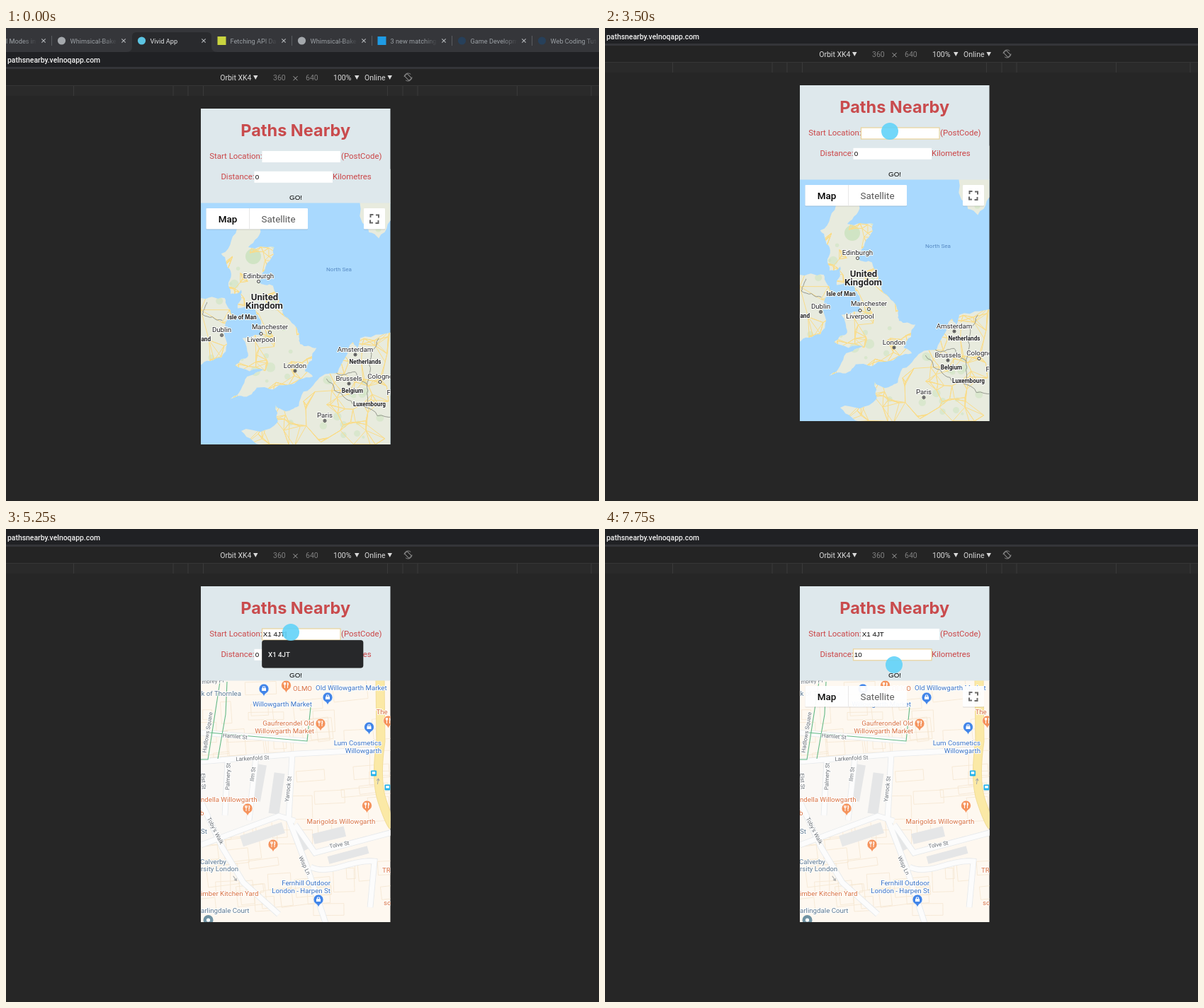
These frames come from a looping animation (837x669 px, 8000 ms). An HTML page:

```html
<!DOCTYPE html>
<html lang="en">
<head>
<meta charset="utf-8">
<title>Route planner demo</title>
<style>
html, body { margin: 0; width: 100%; height: 100%; overflow: hidden; background: #262626; }
svg { display: block; font-family: Roboto, sans-serif; }
text { font-size: 9.7px; fill: #222; }
.mid { text-anchor: middle; }
.end { text-anchor: end; }
.tab { font-size: 9.2px; fill: #9ba0a5; }
.tab.on { fill: #e2e4e6; }
.tool { font-size: 10.5px; fill: #dadada; }
.tool.dim { fill: #808080; }
.url { font-size: 10.4px; font-weight: 500; fill: #f2f2f2; }
.title { font: bold 23.5px Inter, sans-serif; fill: #c94b4d; }
.label { font-size: 11.4px; fill: #cb4547; }
.field { font: 9.8px "Liberation Sans", sans-serif; fill: #000; }
.button { font-size: 13.4px; fill: #565656; }
.button.on { fill: #000; font-weight: 500; }
.item { font-weight: 500; fill: #f2f2f2; }
.status { font-size: 9px; fill: #c4c6c8; }
.map text { paint-order: stroke; stroke: #fff; stroke-width: 2px; stroke-linejoin: round; }
.map .country { font-size: 8.2px; font-weight: bold; }
.map .nation { font-size: 13.2px; font-weight: bold; }
.map .sea { font-size: 8.1px; fill: #5689c2; stroke: none; }
.map .food { fill: #d8703f; }
.map .shop { fill: #3972c4; }
.map .civic { fill: #5c7890; }
.map .road { font-size: 8px; fill: #666c72; text-anchor: middle; }
</style>
</head>
<body>
<script>
const LOOP = 8000, STEP = 250, POSTCODE = 'X1 4JT';
const HISTORY = ['X10 3hd', POSTCODE, 'X17 2PE'];

let seed = 11;
const rand = () => (seed = (seed * 16807) % 2147483647) / 2147483647;
const mix = (a, b, k) => a + (b - a) * k;
const repeat = (n, make) => Array.from({ length: n }, (_, i) => make(i)).join('');

const text = (x, y, str, cls = '', turn = 0) =>
  `<text x="${x}" y="${y}" class="${cls}" transform="rotate(${turn} ${x} ${y})">${str}</text>`;
const rect = (x, y, w, h, fill, more = '') =>
  `<rect x="${x}" y="${y}" width="${w}" height="${h}" fill="${fill}" ${more}/>`;
const dot = (x, y, r, fill, more = '') =>
  `<circle cx="${x}" cy="${y}" r="${r}" fill="${fill}" ${more}/>`;
const line = (d, stroke, width = 1, more = '') =>
  `<path d="${d}" fill="none" stroke="${stroke}" stroke-width="${width}" ${more}/>`;
const poly = (points, fill) => `<polygon points="${points}" fill="${fill}"/>`;
const tilted = (x, y, w, h, turn, fill, more = '') =>
  rect(x - w / 2, y - h / 2, w, h, fill, `transform="rotate(${turn} ${x} ${y})" ${more}`);

// ---- Country map: a few Mercator key points, roughened by midpoint displacement ----
const merc = lat => Math.log(Math.tan(Math.PI / 4 + lat * Math.PI / 360));
const project = (lon, lat) => [408 + 16.6 * (lon + .12), 452 - 951 * (merc(lat) - merc(51.5))];

function rough(points, depth = 3, amount = .3) {
  if (!depth) return points;
  const out = [];
  points.forEach(([x, y], i) => {
    out.push([x, y]);
    const next = points[i + 1];
    if (!next) return;
    const k = (rand() - .5) * amount, dx = next[0] - x, dy = next[1] - y;
    out.push([x + dx / 2 - dy * k, y + dy / 2 + dx * k]);
  });
  return rough(out, depth - 1, amount);
}
const geo = str => rough(str.split(' ').map(p => project(...p.split(',').map(Number))))
  .map(p => p.map(v => v.toFixed(1)).join()).join(' ');

const lands = [
  '-3.1,58.6 -4.1,57.6 -1.9,57.6 -2.9,56.4 -3.2,56 -2,55.8 -1.2,54.6 .1,53.6 .3,52.9 1.7,52.7 .7,51.5 ' +
  '1.4,51.2 -.8,50.75 -3.4,50.6 -3.8,50.25 -5.6,50 -4.2,51.2 -2.7,51.55 -5.2,51.8 -4.1,52.3 -4.6,53.2 ' +
  '-3,53.4 -3,54 -3.5,54.6 -3.2,55 -5,54.7 -4.7,55.6 -5.6,55.4 -5.6,56.5 -6.4,57.3 -5,58.6',
  '-8.3,55.2 -6.1,55.2 -5.5,54.4 -6.1,53.7 -6.4,52.2 -8.3,51.8',
  '-2.5,47.2 -4.7,48.2 -1.6,48.7 -1.8,49.7 -1.1,49.35 .2,49.6 1.6,50.9 3.5,51.4 4.8,53 5.2,52.5 5.4,53.2 9,53.7 9,47',
  '5,61 5.6,58.7 7,58 9,59 9,61'
].map(p => poly(geo(p), '#e8ebde')).join('');

const borders = ['2.55,51.08 4.2,50 5.8,49.55 6,50.75 5,51.45 3.4,51.38', '6,50.75 6.2,51.8 7,53.2',
  '5.8,49.55 8.2,49', '-7.6,55 -8,54.4 -6.3,54.1'].map(p => line('M' + geo(p), '#8d9087', .9)).join('');

// Random towns, each joined to its nearest neighbours
function roadNet() {
  const towns = Array.from({ length: 300 }, () => [275 + rand() * 268, 275 + rand() * 285]);
  let d = '';
  for (const [x, y] of towns) {
    const gap = p => Math.hypot(p[0] - x, p[1] - y);
    for (const n of [...towns].sort((a, b) => gap(a) - gap(b)).slice(1, 5))
      d += `M${x.toFixed(1)} ${y.toFixed(1)}L${n[0].toFixed(1)} ${n[1].toFixed(1)}`;
  }
  return line(d, '#f9dc8a', 1);
}
const woods = repeat(60, () => dot(275 + rand() * 268, 250 + rand() * 306, 2 + rand() * 5, '#d0e4c4', 'opacity=".6"'));

const city = (name, x, y, capital, dy = -4.5) =>
  dot(x, y, 2, '#fff', 'stroke="#333"') + (capital ? dot(x, y, 1, '#222') : '') + text(x, y + dy, name, 'mid');

const countryMap = rect(275, 214, 268, 342, '#a9d9fe') + lands +
  `<g clip-path="url(#land)">${woods}${dot(349, 290, 11, '#d0e4c4')}${roadNet()}</g>` + borders +
  city('Edinburgh', 356.5, 325.5) + city('Manchester', 372.5, 397.5) + city('Liverpool', 360, 399.5, 0, 11) +
  city('Dublin', 304.5, 401.5, 1) + city('London', 408, 452, 1) + city('Paris', 450, 522.5, 1) +
  city('Amsterdam', 493, 429, 1) + city('Brussels', 484, 470, 1) + city('Cologne', 528, 467.5) +
  text(537.5, 486, 'Frankfurt') + text(289, 409.5, 'Ireland', 'country end') +
  text(365, 352, 'United', 'nation mid') + text(364.5, 364, 'Kingdom', 'nation mid') +
  text(333, 379, 'Isle of Man', 'country mid') + text(507, 442, 'Netherlands', 'country mid') +
  text(489, 482.5, 'Belgium', 'country mid') + text(513, 501.5, 'Luxembourg', 'country mid') +
  text(470, 311, 'North Sea', 'sea mid');

// ---- Street map ----
const streets = ['M275 329L410 318L523 312', 'M404 318L399 410L425 478L452 560', 'M408 418L436 458L545 429',
  'M275 385L305 450L335 500L385 545', 'M313 328L309 405', 'M353 322L343 412', 'M275 447L385 406L408 413',
  'M430 478Q445 486 475 477T520 470L514 535', 'M275 288L425 300'].join('');
const mainRoad = 'M528 214L529 300Q521 355 531 385T546 420';
const plots = repeat(70, () => tilted(275 + rand() * 268, 225 + rand() * 331, 12 + rand() * 40, 10 + rand() * 28,
  rand() * 8 - 8, 'none', 'stroke="#f6e7d2" stroke-width=".8"'));
const blocks = tilted(357, 359, 13, 52, 10, '#e5e6e7') + tilted(382, 374, 15, 58, 8, '#e5e6e7') +
  tilted(362, 432, 62, 16, -18, '#e7e8e8') + tilted(417, 438, 11, 34, -28, '#e5e6e7') +
  tilted(456, 433, 46, 15, -14, '#e5e6e7') + tilted(483, 461, 58, 11, -15, '#e5e6e7');

const pin = (x, y, kind) => {
  const food = kind === 'food';
  const mark = food
    ? line(`M${x - 2} ${y - 5}v8m-1.2 -8v3h2.4v-3M${x + 2} ${y + 3}v-8q2 2 0 5`, '#fff')
    : rect(x - 3, y - 2, 6, 4, '#fff') + line(`M${x - 1.6} ${y - 2}v-2h3.2v2`, '#fff');
  return `<path d="M${x} ${y + 10}q-1 -4 -5 -6a7 7 0 1 1 10 0q-4 2 -5 6z" fill="${food ? '#f5935c' : '#4285e8'}"
    stroke="#fff" stroke-width=".6"/>` + mark;
};
// A pin with its one- or two-line label
const place = (kind, px, py, x, y, lines, align = 'end') => pin(px, py, kind) +
  lines.map((s, i) => text(x, y + 10.5 * i, s, `${kind} ${align}`)).join('');
const stop = (x, y) => rect(x - 4, y - 4, 8, 8, '#22b2ea', 'rx="1"') + rect(x - 2.3, y - 2.3, 4.6, 3.4, '#fff');
const arrow = (x, y, turn) =>
  line(`M${x} ${y + 4}v-8m-2 3l2 -3l2 3`, '#a3a7aa', 1, `transform="rotate(${turn} ${x} ${y})"`);

const streetMap = rect(275, 214, 268, 342, '#fef8f0') + plots + poly('275,330 402,320 398,408 275,445', '#faf8f5') +
  blocks + line(streets, '#e6e9eb', 8.6) + line(streets, '#fcfcfc', 7) +
  line(mainRoad, '#f2dd97', 13) + line(mainRoad, '#fbe9a6', 11) +
  line('M312 216L310 262L299 325M287 288L425 300L430 252M275 326H285L302 216', '#62b985', 1.1) +
  stop(519, 345.5) + stop(538.5, 365.5) + arrow(525, 357, 8) + arrow(323, 494, 145) +
  text(292, 218, 'mbrey Pl', 'road', -4) + text(287, 288, 'Hadlows Square', 'road', -81) +
  text(323, 296, 'Hamlet St', 'road', 5) + text(348, 327, 'Larkenfold St', 'road', -3) +
  text(316, 350, 'Palmery St', 'road', -88) + text(351, 347, 'Ilm St', 'road', -83) +
  text(401, 368, 'Yarrock St', 'road', -84) + text(276, 357, 'Elst St', 'road', 86) +
  text(293, 428, "Toby's Walk", 'road', 63) + text(419, 477, 'Wisp Ln', 'road', 65) +
  text(471, 449, 'Tolve St', 'road', -10) + text(275, 431, 'St', 'civic') +
  place('food', 395.5, 222, 405, 229, ['OLMO'], '') +
  place('shop', 364, 227, 390, 251, ['Willowgarth Market'], 'mid') +
  place('shop', 454, 239, 437, 228, ['Old Willowgarth Market'], '') +
  place('food', 444, 276, 435, 278, ['Gaufrerondel Old', 'Willowgarth Market']) +
  place('shop', 512.5, 281, 530, 306, ['Lum Cosmetics', 'Willowgarth']) +
  place('food', 539.5, 272, 522.5, 261.5, ['The'], '') +
  place('food', 341, 396, 275, 385.5, ['ndella Willowgarth'], '') +
  place('food', 509.5, 392, 473, 416.5, ['Marigolds Willowgarth'], 'mid') +
  place('food', 377, 447, 274, 405, ['b'], '') +
  place('shop', 441, 525, 458, 504, ['Fernhill Outdoor', 'London - Harpen St']) +
  text(275.5, 236, 'k of Thornlea', 'civic') + text(274, 473.5, 'Calverby', 'civic') +
  text(275, 484, 'rsity London', 'civic') + text(275, 542.5, 'arlingdale Court', 'civic') +
  text(275, 519, 'imber Kitchen Yard', 'food') + text(531, 486, 'TR', 'food') + text(533, 531.5, 'so', 'food') +
  dot(285.5, 553, 7, '#6f92a2') + dot(285.5, 553, 2.6, '#fff');

// ---- Browser chrome ----
const TABS = [['', 'l Modes in'], ['#a4a8ac', 'Whimsical-Bake'], ['#5cc4e2', 'Vivid App'], ['#c9d43f', 'Fetching API Da'],
  ['#a4a8ac', 'Whimsical-Bake'], ['#1f9be4', '3 new matching'], ['#27405a', 'Game Developm'], ['#27405a', 'Web Coding Tutor']];
const ACTIVE = 2;

function tab([color, name], i) {
  const x = 64 + 113 * (i - 1), on = i === ACTIVE;
  const square = color === '#c9d43f' || color === '#1f9be4';
  const icon = !color ? '' : square ? rect(x + 8.5, 12, 12, 12, color) : dot(x + 14.5, 18, 5.6, color);
  return icon + text(color ? x + 26.5 : 0, 21.5, name, on ? 'tab on' : 'tab') +
    (on ? '' : rect(x + 73, 10, 22, 16, 'url(#fade)')) +
    line(`M${x + 99.3} 15.3l5.4 5.4m0 -5.4l-5.4 5.4`, '#b4b7ba', 1.1) +
    (on || i === ACTIVE + 1 ? '' : rect(x, 11, 1, 14, '#5a5c60'));
}
const tabs = rect(0, 0, 837, 34, '#35363a') +
  '<path d="M170 34q8 0 8 -8v-14q0 -6 6 -6h100q6 0 6 6v14q0 8 8 8z" fill="#292a2d"/>' + TABS.map(tab).join('');

const arrowDown = x => poly(`${x},34 ${x + 6.5},34 ${x + 3.25},40`, '#dadada');
// Ruler marks lie mirrored around the middle of the device
const ticks = [130, 151.5, 172.5, 313, 417.5].map(d =>
  rect(408 - d, 49, 1, 14, '#3a3a3a') + rect(408 + d, 49, 1, 14, '#3a3a3a')).join('');
const toolbar = rect(0, 0, 837, 23, '#202124') + rect(0, 22, 837, 3, '#343539') +
  rect(0, 25, 837, 23, '#242424') + rect(0, 48, 837, 15, '#2a2a2a') + rect(0, 48, 837, 1, '#363636') + ticks +
  text(2, 15.5, 'pathsnearby.velnoqapp.com', 'url') +
  text(346.5, 40.5, 'Orbit XK4', 'tool end') + arrowDown(349) + text(377, 40.5, '360', 'tool dim') +
  line('M405.5 35.2l6 6m0 -6l-6 6', '#a8a8a8') + text(423, 40.5, '640', 'tool dim') +
  text(462, 40.5, '100%', 'tool') + arrowDown(492) + text(506, 40.5, 'Online', 'tool') + arrowDown(538.5) +
  tilted(567.5, 36.5, 5, 9, -45, 'none', 'stroke="#888"') + dot(567.5, 36.5, 5.5, 'none', 'stroke="#888" stroke-dasharray="12 5.3"');

const panel = (x, w) => rect(x, 222.5, w, 30, '#0002', 'rx="1"') + rect(x, 222, w, 29.5, '#fff', 'rx="1"');
const corners = repeat(4, i => line('M514.5 235V231H518.5', '#666', 2, `transform="rotate(${90 * i} 520 237)"`));
const controls = panel(282.5, 143.5) + panel(505, 30) + rect(343, 222, 1, 29.5, '#e8e8e8') + corners +
  text(313, 241.5, 'Map', 'button on mid') + text(384.5, 241.5, 'Satellite', 'button mid');

const form = rect(275, 81, 268, 133.5, '#dee8ec') + text(408.7, 119.8, 'Paths Nearby', 'title mid') +
  text(361.5, 152, 'Start Location:', 'label end') + text(473, 152, '(PostCode)', 'label') +
  text(350.5, 181, 'Distance:', 'label end') + text(461, 181, 'Kilometres', 'label') +
  text(409, 210, 'GO!', 'field mid');

document.body.innerHTML = `<svg width="837" height="669" viewBox="0 0 837 669">
  <defs>
    <linearGradient id="fade"><stop stop-color="#35363a" stop-opacity="0"/><stop offset=".9" stop-color="#35363a"/></linearGradient>
    <clipPath id="land">${lands}</clipPath>
    <clipPath id="device"><rect x="275" y="81" width="267.5" height="475"/></clipPath>
  </defs>
  ${rect(0, 0, 837, 669, '#262626')}
  <g id="page">${toolbar}
    <g clip-path="url(#device)">
      <g id="country" class="map">${countryMap}</g>
      <g id="streets" class="map">${streetMap}</g>
      <g id="controls">${controls}</g>${form}
    </g>
    <g id="live"></g>
  </g>
  <g id="tabs">${tabs}</g></svg>`;

// ---- Timeline ----
const el = id => document.getElementById(id);
const show = (id, on) => el(id).setAttribute('display', on ? 'inline' : 'none');

// Pointer moves: start, end, from, to
const MOVES = [[500, 1500, [430, 148], [408, 146]], [1500, 1750, [408, 146], [402, 146]], [7250, 7750, [402, 146], [408, 192]]];

function pointer(t) {
  if (t < 500) return '';
  if (t >= 2000 && t < 2750)
    return dot(402, 157, 14, '#d5f1fb55', 'stroke="#8edaf2" stroke-width="2"');
  const [from, to, a, b] = MOVES.filter(m => m[0] <= t).pop();
  const k = Math.min(1, (t - from) / (to - from));
  return dot(mix(a[0], b[0], k), mix(a[1], b[1], k), 12, '#5fd2f8', 'opacity=".88"');
}

const input = (x, y, value, focused) =>
  rect(x, y, 110.5, 16, '#fff', focused ? 'stroke="#ead29a" stroke-width="1.2"' : '') +
  text(x + 1.3, y + 11.2, value, 'field');

function dropdown(typed) {
  const items = HISTORY.filter(h => h.startsWith(typed));
  return rect(361.5, 157.5, 142.5, 12 + 26.7 * items.length, '#27282a', 'rx="3" stroke="#1a1a1a" stroke-width=".6"') +
    items.map((s, i) => text(370, 180.5 + 26.6 * i, s, 'item')).join('');
}

const status = rect(275, 541, 88.5, 15, '#2d2e31', 'stroke="#47484b" stroke-width=".6"') +
  text(279, 552, 'Waiting for maps....', 'status');

function draw(now) {
  const t = Math.floor(now % LOOP / STEP) * STEP;
  const zoomed = t >= 3750, startFocus = t >= 2750 && t < 5500, distFocus = t >= 5750;
  const typed = POSTCODE.slice(0, Math.max(0, (t - 3500) / STEP));
  const caretOn = startFocus && (zoomed || t % 1000 < 500);
  const distance = t < 7000 ? '0' : '10'.slice(0, (t - 6750) / STEP);

  show('tabs', t < 500);
  el('page').setAttribute('transform', `translate(0 ${t < 500 ? 33 : 0})`);
  show('country', !zoomed);
  show('streets', zoomed);
  el('controls').setAttribute('opacity', zoomed ? Math.min(.95, Math.max(0, (t - 5250) / 500)) : 1);
  el('live').innerHTML =
    input(361.5, 141, typed + (caretOn ? '|' : ''), startFocus) +
    input(350.5, 169.8, distance, distFocus) +
    (distFocus && t < 7000 ? rect(351, 172, 7, 12, '#6aa9e880') : '') +
    (zoomed && startFocus ? dropdown(typed) : '') +
    (t === 3750 ? status : '') + pointer(t);
}

const start = performance.now();
(function frame() {
  draw(performance.now() - start);
  requestAnimationFrame(frame);
})();
</script>
</body>
</html>
```
